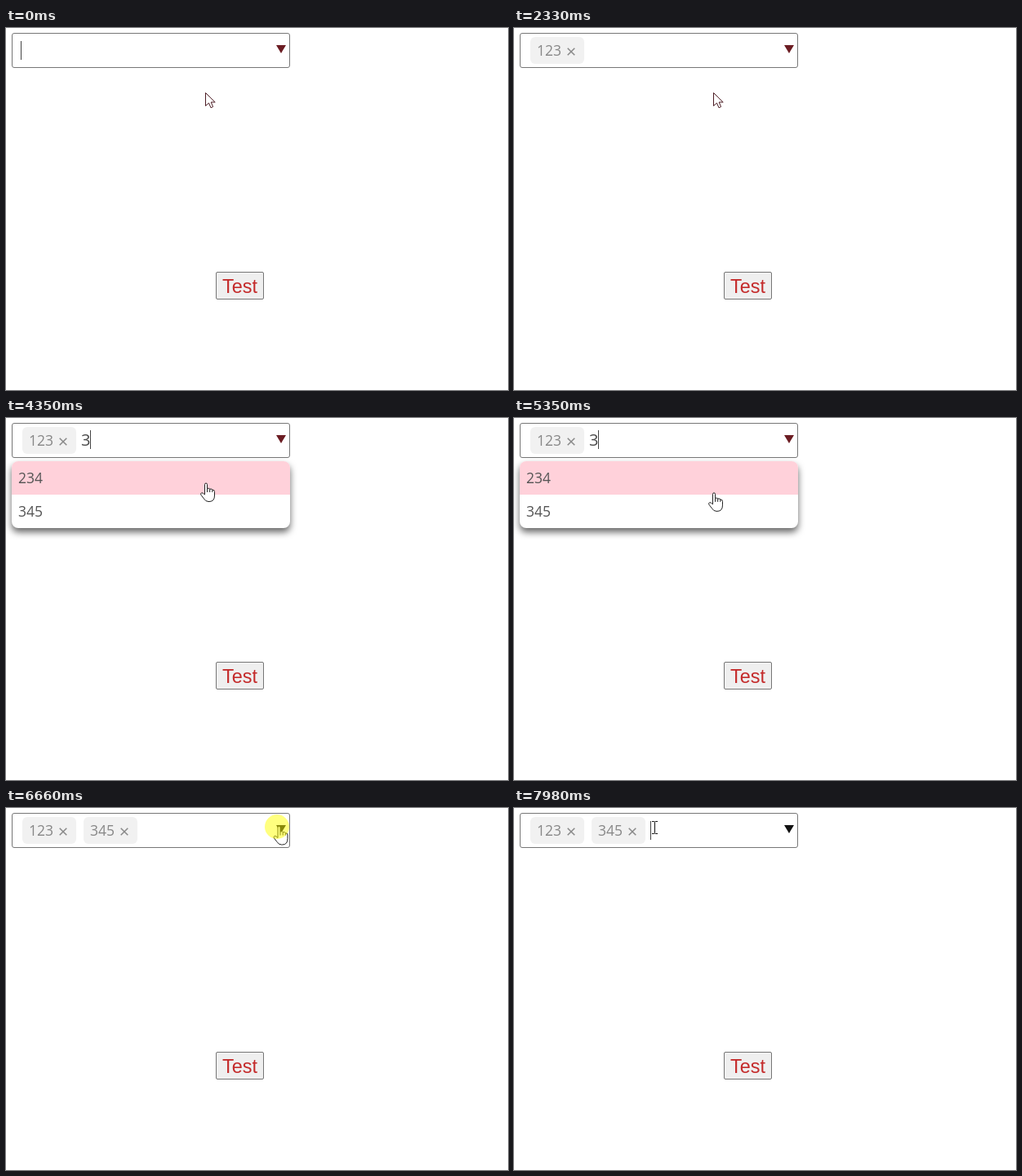
An HTML page for the animation above (8 s loop, 615 px wide and 444 px high).

```html
<!DOCTYPE html>
<html lang="en">
<head>
<meta charset="utf-8">
<title>Tag select</title>
<style>
  html, body { margin: 0; width: 100%; height: 100%; overflow: hidden; background: #fff; }
  body { position: relative; font: 17.5px "Open Sans", "Noto Sans", sans-serif; color: #555; }
  body > *, .tag, .tag svg { position: absolute; box-sizing: border-box; }
  #field { left: 7px; top: 6px; width: 341px; height: 43px; border: 1px solid #767676; border-radius: 3px; }
  #text { top: 5px; font-size: 20px; line-height: 43px; color: #4c4c4c; }
  .tag { top: 11px; width: 66px; height: 33px; padding-left: 8px; line-height: 33px;
         border-radius: 6px; background: #f1f1f1; color: #888; }
  .tag svg { left: 45px; top: 13px; }
  #list { left: 7px; top: 53px; width: 341px; border-radius: 8px; overflow: hidden;
          background: #fff; box-shadow: 0 5px 8px rgba(0, 0, 0, .6); }
  #list div { height: 41px; line-height: 41px; padding-left: 8px; }
  #list .hover { background: #ffd1da; }
  #caret { width: 1px; height: 23px; background: #444; }
  #test { left: 257px; top: 299px; width: 59px; height: 34px; border: 1px solid #767676; border-radius: 2px;
          background: #efefef; color: #c42b2b; text-align: center;
          font: 23.4px/34px "Liberation Sans", Arial, sans-serif; }
  #overlay { left: 0; top: 0; }
</style>
</head>
<body>
<div id="field"></div>
<div id="tags"></div>
<div id="text"></div>
<div id="list"></div>
<div id="test">Test</div>
<div id="caret"></div>
<svg id="overlay" width="615" height="444">
  <path id="triangle" d="M331 21H343L337 31Z"/>
  <path id="pointer" fill="#fff" stroke-linejoin="round"/>
  <circle id="click" r="15" fill="#ff0" fill-opacity=".5"/>
</svg>
<script>
const LOOP = 8000, ROW = 41, LIST_TOP = 53;
const $ = id => document.getElementById(id);

// Each entry changes only the properties it names.
const timeline = [
  [0, { tags: [], text: '', list: [], caret: [18, 16] }],
  [380, { caret: null }],
  [930, { caret: [18, 16] }],
  [1080, { text: '1', list: ['123'], caret: [29, 15] }],
  [1630, { caret: null }],
  [1710, { caret: [44, 62], click: [245, 79] }],
  [1780, { tags: ['123'], text: '', list: [], caret: [92, 16], click: null }],
  [2330, { caret: null }],
  [2640, { text: '2', list: ['234'], caret: [103, 15] }],
  [3170, { caret: null }],
  [3720, { caret: [103, 15] }],
  [4120, { text: '', list: [], caret: [92, 16] }],
  [4350, { text: '3', list: ['234', '345'], caret: [103, 15] }],
  [4810, { caret: null }],
  [5270, { caret: [103, 15] }],
  [5500, { caret: [44, 103], click: [245, 95] }],
  [5660, { tags: ['123', '345'], text: '', list: [], caret: [167, 16], click: null }],
  [6200, { caret: null }],
  [6660, { click: [332, 23] }],
  [6730, { list: ['234', '456', '567', '678'], caret: [167, 16], click: null }],
  [7200, { caret: null }],
  [7430, { caret: [167, 16], click: [332, 23] }],
  [7510, { list: [], click: null }]
];

// start, step length, steps, from, to
const moves = [
  [5270, 77, 3, [244, 79], [244, 95]],
  [5890, 77, 11, [244, 95], [333.5, 21.5]],
  [7680, 75, 5, [333.5, 21.5], [172, 24]]
];

const pointers = {
  arrow: ['M.5 .5V16.5L4.5 13L7 18.8L9.6 17.6L7.2 12H12.2Z', '#4a1a22'],
  hand: ['M-.5 14.5V2.5Q-.5 1 1 1T2.5 2.5V7.5Q5.4 6.5 5.7 8.2Q8.5 7.4 8.8 9.2Q11.5 8.8 11.5 11.5V16' +
         'Q11.5 23.5 5 23.5H4Q.5 23.5-1.5 20L-5 15.5Q-6 13.5-4.5 12.8Q-3 12.3-.5 15Z' +
         'M2.5 7.5V12M5.7 8.2V12M8.8 9.2V12', '#222'],
  beam: ['M-3 -7.5H-.5Q.5 -7.5 .5 -6.5Q.5 -7.5 1.5 -7.5H4M.5 -6.5V6.5' +
         'M-3 7.5H-.5Q.5 7.5 .5 6.5Q.5 7.5 1.5 7.5H4', '#111']
};

const tagHTML = (label, i) => `<div class="tag" style="left:${20 + 75 * i}px">${label}
  <svg width="10" height="10" stroke="#888" stroke-width="1.5"><path d="M.7.7L9.3 9.3M9.3.7L.7 9.3"/></svg></div>`;

function pointerAt(t) {
  let pos = moves[0][3];
  for (const [start, step, count, from, to] of moves) {
    if (t < start) break;
    const u = Math.min(1, (Math.floor((t - start) / step) + 1) / count);
    const eased = u * u * (3 - 2 * u);
    pos = from.map((v, i) => v + (to[i] - v) * eased);
  }
  return pos;
}

function setHTML(id, html) {
  const el = $(id);
  if (el.source !== html) el.innerHTML = el.source = html;
}

function render(t) {
  const state = {};
  for (const [start, change] of timeline) if (start <= t) Object.assign(state, change);
  const { tags, text, list, caret, click } = state;
  const [x, y] = pointerAt(t);
  const hovered = x < 348 ? Math.floor((y - LIST_TOP) / ROW) : -1;

  setHTML('tags', tags.map(tagHTML).join(''));
  setHTML('text', text);
  $('text').style.left = (tags.length ? 92 : 18) + 'px';
  $('list').hidden = !list.length;
  setHTML('list', list.map((label, i) =>
    `<div${i === hovered ? ' class="hover"' : ''}>${label}</div>`).join(''));

  $('caret').hidden = !caret;
  if (caret) [$('caret').style.left, $('caret').style.top] = caret.map(v => v + 'px');

  const inField = y > 6 && y < 49;
  const kind = list[hovered] || inField && x > 322 ? 'hand' : inField ? 'beam' : 'arrow';
  const [shape, color] = pointers[kind];
  const pointer = $('pointer');
  pointer.setAttribute('d', shape);
  pointer.setAttribute('stroke', color);
  pointer.setAttribute('fill', kind === 'beam' ? 'none' : '#fff');
  pointer.setAttribute('transform', `translate(${x} ${y})`);
  $('triangle').setAttribute('fill', t < 6590 ? '#6b1c22' : '#111');

  $('click').setAttribute('visibility', click ? 'visible' : 'hidden');
  if (click) $('click').setAttribute('transform', `translate(${click})`);
}

function tick() {
  render(performance.now() % LOOP);
  requestAnimationFrame(tick);
}
tick();
</script>
</body>
</html>
```
